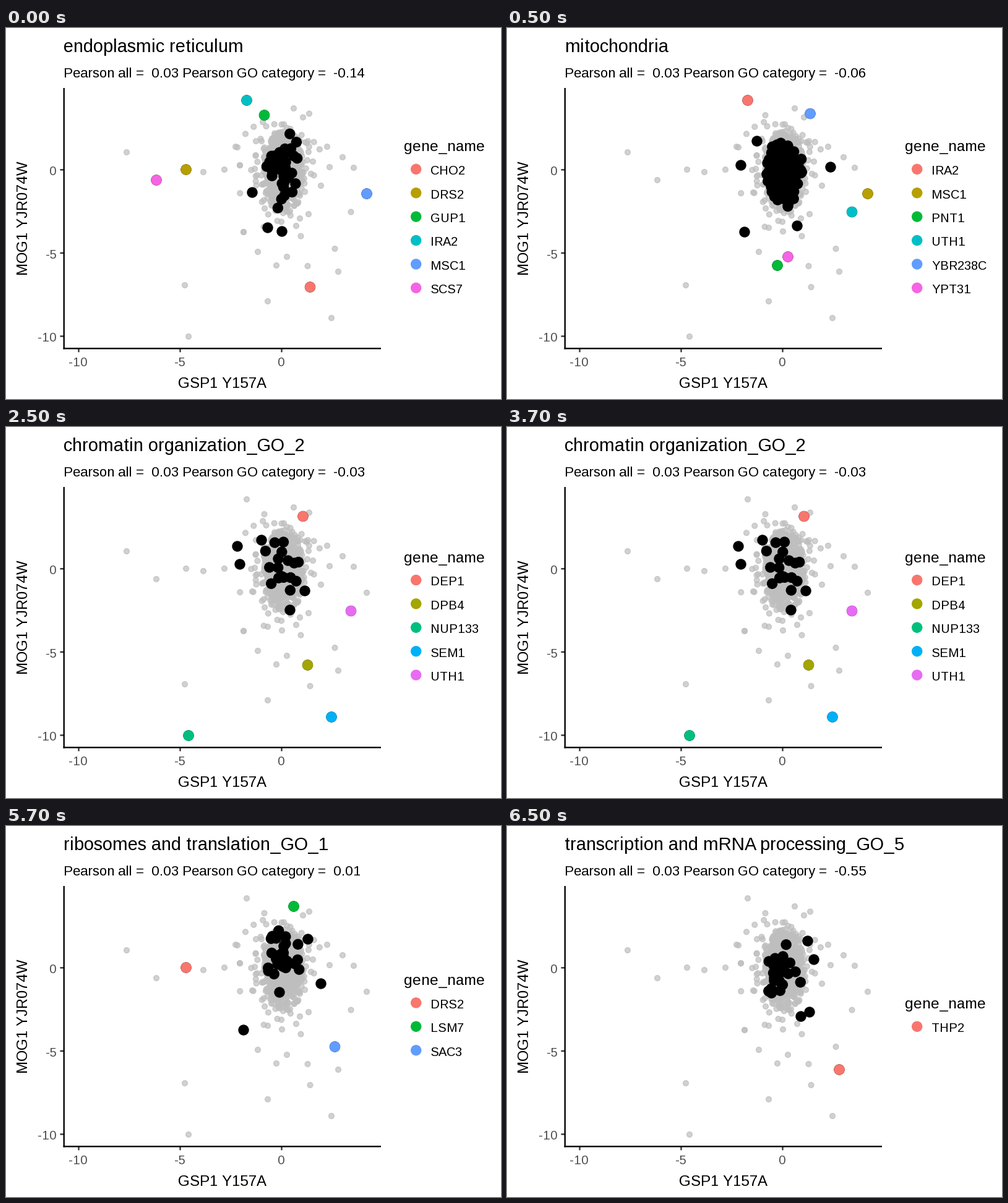
A matplotlib script that plays this animation: 800 px wide and 600 px high, repeating every 8 s.

```python
import numpy as np
import matplotlib.pyplot as plt
from matplotlib.animation import FuncAnimation

DPI = 160
W, H = 800, 600
PX = 72 / DPI  # points per pixel
STROKE = 1.57 * PX
SMALL, LARGE = 8.68, 15.8  # marker diameters in pixels
AXIS_WIDTH = 2.37 * PX
BASE = 11
KEY_STEP = 38.4

# Whole-pixel glyph advances, as in hinted screen text.
plt.rcParams.update({"font.family": "Liberation Sans",
                     "text.hinting_factor": 1})

HUES = {
    1: ["#F8766D"],
    3: ["#F8766D", "#00BA38", "#619CFF"],
    5: ["#F8766D", "#A3A500", "#00BF7D", "#00B0F6", "#E76BF3"],
    6: ["#F8766D", "#B79F00", "#00BA38", "#00BFC4", "#619CFF", "#F564E3"],
}

# All positions are stage pixels, y pointing down.
GENES = {
    "CHO2": (491.5, 419), "DRS2": (291, 229), "GUP1": (417.5, 141),
    "IRA2": (389, 117), "MSC1": (583, 268), "SCS7": (243, 246),
    "PNT1": (437, 384), "UTH1": (557.5, 297.5), "YBR238C": (490, 138.5),
    "YPT31": (454, 370), "DEP1": (480, 144.5), "DPB4": (487.5, 385),
    "NUP133": (295, 499), "SEM1": (526, 469), "LSM7": (465, 130),
    "SAC3": (531.5, 357), "THP2": (537, 394),
}
FAR_POINTS = [(195, 201), (319, 233), (353, 229), (371, 192), (289, 416),
              (423, 442), (544, 209), (562, 226), (519, 192), (407, 362)]

rng = np.random.default_rng(7)


def cluster(center, spread, count, strays=(), limit=2.2):
    """Gaussian points within `limit` deviations, plus a few set apart."""
    unit = rng.normal(size=(3 * count, 2))
    unit = unit[np.hypot(*unit.T) < limit][:count]
    points = np.array(center) + unit * spread
    return np.vstack([points, *strays])


# title, category correlation, members, highlighted genes, number of steps
SCENES = [
    ("endoplasmic reticulum", "-0.14",
     cluster((449, 231), (15, 30), 38, [(398, 266), (423, 323), (446, 329)]),
     "CHO2 DRS2 GUP1 IRA2 MSC1 SCS7", 1),
    ("mitochondria", "-0.06",
     cluster((447, 238), (15, 25), 160,
             [(404, 183), (378, 222), (523, 225), (384, 330), (469, 320)]),
     "IRA2 MSC1 PNT1 UTH1 YBR238C YPT31", 4),
    ("chromatin organization_GO_2", "-0.03",
     cluster((449, 222), (17, 24), 17,
             [(374, 193), (378, 222), (413, 183), (483, 265), (459, 296)]),
     "DEP1 DPB4 NUP133 SEM1 UTH1", 4),
    ("ribosomes and translation_GO_1", "0.01",
     cluster((448, 210), (15, 22), 26,
             [(488, 183), (509, 255), (384, 330), (442, 269)]),
     "DRS2 LSM7 SAC3", 4),
    ("transcription and mRNA processing_GO_5", "-0.55",
     cluster((447, 234), (16, 22), 24,
             [(486, 186), (496, 216), (489, 301), (475, 308)]),
     "THP2", 3),
]

fig = plt.figure(figsize=(W / DPI, H / DPI), dpi=DPI, facecolor="white")
ax = fig.add_axes([0, 0, 1, 1])
ax.set_xlim(0, W)
ax.set_ylim(H, 0)
ax.axis("off")


def dots(points, diameter, color, z):
    x, y = np.asarray(points, float).T
    marks = ax.scatter(x, y, s=(diameter * PX) ** 2, facecolors=color,
                       edgecolors=color, zorder=z)
    # Two equal widths keep Agg from rounding marker centres to whole pixels.
    marks.set_linewidth([STROKE, STROKE])
    return marks


def label(x, y, text, scale=1.0, **style):
    return ax.text(x, y, text, fontsize=BASE * scale, va="baseline", **style)


def line(xs, ys, color):
    ax.plot(xs, ys, color=color, lw=AXIS_WIDTH, solid_capstyle="butt",
            snap=False)


def draw_axes():
    for value in (-10, -5, 0):
        x, y = 445.5 + 32.8 * value, 229.3 - 26.92 * value
        line([x, x], [518, 524.3], "#333333")
        line([87.4, 93.5], [y, y], "#333333")
        label(x - 0.5, 547, str(value), 0.8, ha="center", color="#4D4D4D")
        label(82, y + 8.7, str(value), 0.8, ha="right", color="#4D4D4D")
    line([93.7, 93.7], [97, 519.4], "black")
    line([92.5, 606], [518.3, 518.3], "black")
    label(349.5, 582, "GSP1 Y157A", ha="center")
    label(35, 307, "MOG1 YJR074W", ha="center", rotation=90,
          rotation_mode="anchor")


def build_scene(title, correlation, members, names, _steps):
    names = names.split()
    spots = [GENES[name] for name in names]
    colors = HUES[len(names)]
    top = 228.3 + (6 - len(names)) * KEY_STEP / 2
    keys = [(662.7, top + KEY_STEP * i) for i in range(len(names))]
    caption = f"Pearson all =  0.03 Pearson GO category =  {correlation}"
    artists = [
        label(93, 39, title, 1.2),
        label(93, 80, caption, 0.9),
        label(643, top - 29, "gene_name"),
        dots(members, LARGE, "black", 3),
        dots(spots, LARGE, "black", 3),
        dots(spots, LARGE, colors, 4),
        dots(keys, LARGE, colors, 4),
    ]
    artists += [label(686, y + 9, name, 0.8)
                for name, (_, y) in zip(names, keys)]
    return artists


draw_axes()
background = [
    cluster((449, 231), (14, 27), 620, limit=2.6),
    cluster((446, 238), (24, 40), 140),
    cluster((446, 240), (38, 52), 45),
    FAR_POINTS,
    list(GENES.values()),
    *(scene[2] for scene in SCENES),
]
dots(np.vstack(background), SMALL, (0.745, 0.745, 0.745, 0.7), 2)

groups = [build_scene(*scene) for scene in SCENES]
timeline = np.repeat(np.arange(len(SCENES)), [scene[4] for scene in SCENES])


def update(step):
    for index, group in enumerate(groups):
        for artist in group:
            artist.set_visible(index == timeline[step])
    return [artist for group in groups for artist in group]


anim = FuncAnimation(fig, update, frames=len(timeline), interval=500,
                     repeat=True, repeat_delay=0, blit=False)
plt.show()
```
